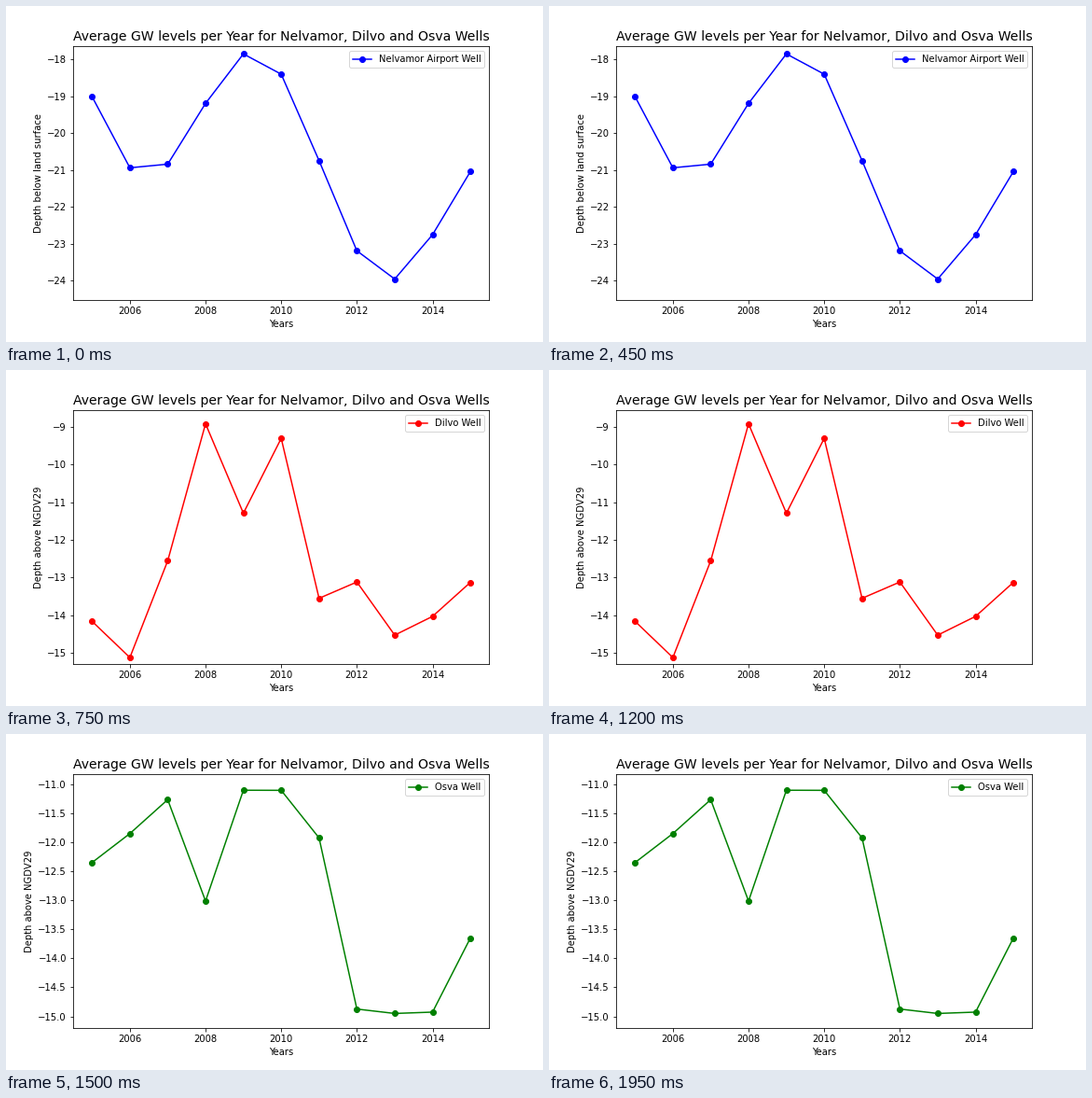
Write a matplotlib script that moves like this. It is 576x360 px and loops after 2250 ms.

```python
import numpy as np
import matplotlib.pyplot as plt
from matplotlib.animation import FuncAnimation
from matplotlib.ticker import MultipleLocator

plt.rcParams["font.family"] = "DejaVu Sans"

START = 2005
TITLE = "Average GW levels per Year for Nelvamor, Dilvo and Osva Wells"


def bump(t, height, centre, width):
    return height * np.exp(-((t - centre) / width) ** 2)


def airport_levels(t):
    """A regular swing around a falling water table."""
    return -18.22 - 0.44 * t + 2.35 * np.cos(2 * np.pi * (t - 4.45) / 6.4)


def dilvo_levels(t):
    """A broad hump with a fading zigzag that quickens after its crest."""
    since = t - 3
    pace = np.where(since < 0, np.pi / 2, np.pi)
    zigzag = bump(t, 1.75, 3, 4) * np.cos(pace * since)
    return -14.25 + bump(t, 4.6, 4, 2) + zigzag + bump(t, 1.2, 10, 0.5)


def osva_levels(t):
    """A plateau with a slow start and one dip, then a drop and a late rise."""
    drop = 1.925 * (1 + np.tanh(2.6 * (t - 6.25)))
    return (-11.1 - drop - bump(t, 1.25, 0, 1.4) - bump(t, 1.9, 3, 0.4)
            + bump(t, 1.3, 10, 0.5))


# label, y-axis label, colour, tick step, y limits, level rule
WELLS = [
    ("Nelvamor Airport Well", "Depth below land surface", "blue", 1,
     (-24.52, -17.65), airport_levels),
    ("Dilvo Well", "Depth above NGDV29", "red", 1,
     (-15.3, -8.56), dilvo_levels),
    ("Osva Well", "Depth above NGDV29", "green", 0.5,
     (-15.2, -10.83), osva_levels),
]

fig, ax = plt.subplots(figsize=(8, 5), dpi=72)
fig.subplots_adjust(bottom=0.125)


def draw(i):
    label, ylabel, color, step, limits, levels = WELLS[i]
    t = np.arange(11)
    ax.clear()
    ax.plot(START + t, levels(t), color=color, marker="o", label=label)
    ax.set_ylim(limits)
    ax.set_title(TITLE, fontsize=14)
    ax.set_xlabel("Years")
    ax.set_ylabel(ylabel)
    ax.xaxis.set_major_locator(MultipleLocator(2))
    ax.yaxis.set_major_locator(MultipleLocator(step))
    ax.legend(loc="upper right")


anim = FuncAnimation(fig, draw, frames=len(WELLS), init_func=lambda: draw(0),
                     interval=750, repeat=True, repeat_delay=0)
plt.show()
```
